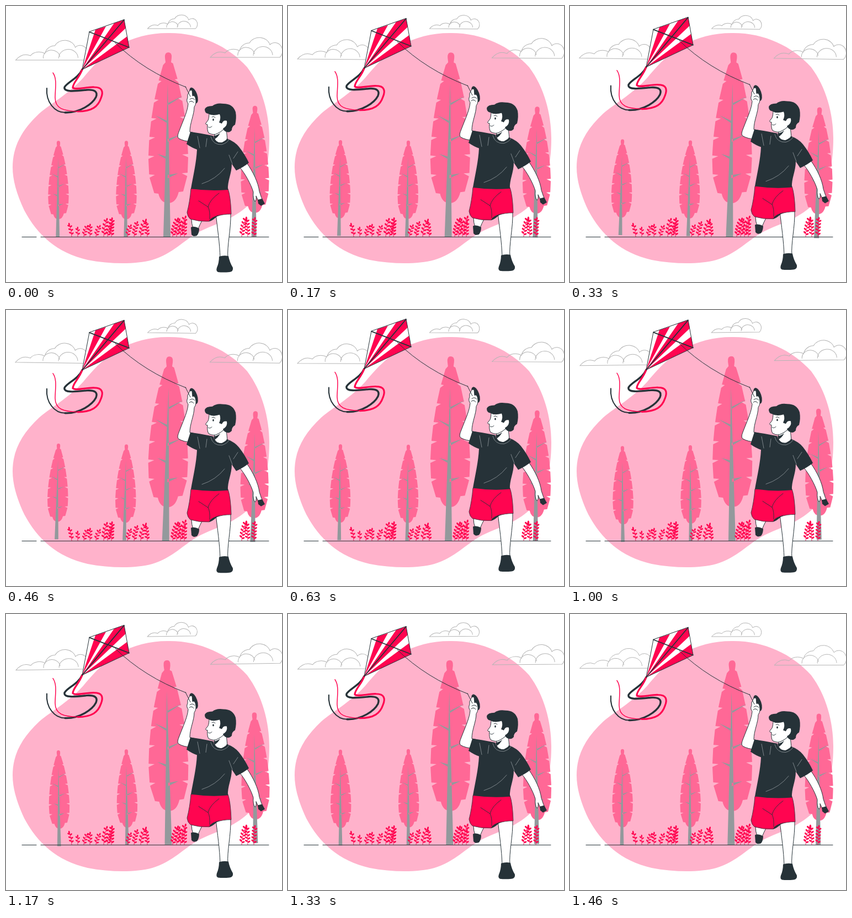
An HTML page for the animation above (1500 ms loop, 500 by 500 pixels).

```html
<!DOCTYPE html>
<html lang="en">
<head>
<meta charset="utf-8">
<title>Boy flying a kite</title>
<style>
  html, body { margin: 0; height: 100%; overflow: hidden; background: #fff; }
  svg { display: block; width: 100vw; height: 100vh; }
  .dark { fill: #263238; }
  .red { fill: #ff0550; }
  .bark { fill: #93999c; }
  .skin { fill: #fff; stroke: #263238; stroke-linejoin: round; }
  .line { fill: none; stroke: #263238; stroke-linecap: round; stroke-linejoin: round; }
  .ribbon { fill: none; stroke-linecap: round; }
  .crease { fill: none; stroke: #a3aaae; stroke-width: .7; stroke-linecap: round; }
  .cloud { fill: none; stroke: #b4b4b4; vector-effect: non-scaling-stroke; }
</style>
</head>
<body>
<svg viewBox="0 0 500 500">
  <defs>
    <path id="cloud" class="cloud" d="M0 0Q12-14 27-8a17 12 0 0 1 26-4a18 18 0 0 1 18-14a20 18 0 0 1 37 3a11 12 0 0 1 18 23ZM50-3a10 9 0 0 1 30-3M78-3a12 11 0 0 1 35-1"/>
    <g id="tree">
      <path id="foliage" fill="#ff6896"/>
      <path id="trunk" class="bark"/>
    </g>
  </defs>

  <path fill="#ffb2cb" d="M293 49C350 48 402 72 437 111C464 147 477 195 477 240C477 290 467 332 438 362C412 386 381 394 352 408C322 424 302 449 265 460C235 468 190 468 148 460C92 447 57 415 33 370C19 340 12 315 12 292C12 255 28 225 60 195C85 174 115 158 140 130C165 100 180 86 205 71C230 57 260 49 293 49Z"/>

  <g id="clouds">
    <use href="#cloud" transform="translate(17.5 98)"/>
    <use href="#cloud" transform="translate(256.5 41) scale(.69)"/>
    <use href="#cloud" transform="translate(370 93)"/>
  </g>

  <g id="trees">
    <use href="#tree" transform="translate(95 418) scale(.52)"/>
    <use href="#tree" transform="translate(218 418) scale(.52)"/>
    <use href="#tree" transform="translate(294 418)"/>
    <use href="#tree" transform="translate(451 418) scale(.71)"/>
  </g>

  <path class="line" d="M29 418.5H55M63 418.5H476"/>
  <g id="bushes"></g>

  <g id="flyer">
    <!-- tails, thinner towards the end -->
    <g class="ribbon" stroke="#263238">
      <path stroke-width="3.4" d="M138 115C131 131 111 138 106 147C104 157 127 154 146 152C160 151 167 155 163 165C157 177 134 194 107 193"/>
      <path stroke-width="2" d="M107 193C88 193 72 174 74 149"/>
    </g>
    <g class="ribbon" stroke="#ff0550">
      <path stroke-width="3.2" d="M138 115C133 130 121 139 121 148C127 153 146 146 160 147C174 147 177 155 172 167C167 182 156 191 130 191"/>
      <path stroke-width="1.5" d="M130 191C104 190 89 186 89 166C89 150 93 132 85 121"/>
    </g>

    <!-- kite -->
    <path fill="#fff" d="M214 25L223 75L138 115L151 47Z"/>
    <path class="red" d="M138 115L162 43L181 37ZM138 115L196 31L214 25L217 40ZM138 115L219.5 55L223 75Z"/>
    <path class="line" d="M214 25L223 75L138 115L151 47Z"/>
    <path class="line" stroke-width="1.7" d="M151 47L223 75M214 25L138 115"/>
    <path class="line" d="M198 67Q250 118 326 147"/>

    <!-- raised arm -->
    <ellipse class="dark" cx="340" cy="162" rx="6.5" ry="15" transform="rotate(-19 340 162)"/>
    <path class="skin" d="M330 177C329 190 322 205 317 218C312 231 309 236 313 240Q322 245 336 246L342 230L333 228C333 212 341 197 341 183Q346 176 343 166Q341 161 338 163L337 153Q333 151 331 157Q328 160 329 166Q326 172 330 177Z"/>
    <path class="line" d="M325 146L334 164M333 169Q338 165 342 170M332 174Q336 170 340 175"/>

    <!-- legs and shoes -->
    <path class="skin" d="M336 385Q336 395 339 403L348 404Q351 396 356 387Z"/>
    <path class="dark" d="M335 401Q340 398 350 403Q350 411 346 416Q339 419 336 414Z"/>
    <path class="skin" d="M380 376C383 403 387 428 388 457H402C400 434 408 405 407 374Z"/>
    <path class="dark" d="M386 454Q394 451 403 453Q405 464 411 474Q412 481 405 482Q393 483 384 482Q380 480 382 474Q386 465 386 454Z"/>

    <!-- shorts -->
    <path class="red" stroke="#263238" stroke-width=".8" d="M335 331H402Q407 345 408 377Q392 377 382 381Q374 388 368 390Q350 391 334 386Q329 382 328 374Q333 355 335 331Z"/>
    <path class="dark" d="M368 390Q370 382 392 377Q384 379 381 382Q374 389 368 390Z"/>
    <path class="line" stroke-width=".9" d="M369 386Q370 371 366 364L349 353M366 364Q369 351 386 339"/>

    <!-- lowered arm -->
    <path class="skin" d="M424 293C432 302 444 323 448 337Q447 349 451 354Q454 353 453 344Q457 354 461 360L467 357Q462 346 459 336C457 320 448 301 436 284Z"/>
    <path class="dark" d="M456 351L464 349L469 358L462 362L457 358Z"/>

    <!-- neck and shirt -->
    <path class="skin" d="M379 228L377 238Q380 249 391 248L401 242L399 222Z"/>
    <path class="dark" d="M376 235Q382 235 388 230Q384 238 378 241Z"/>
    <path class="dark" d="M334 228Q350 230 375 235Q380 250 392 247Q399 244 400 240Q415 246 422 255Q433 269 440 284Q430 292 417 298L409 286C409 304 401 317 402 333Q369 336 335 331C339 308 345 283 346 260Q337 257 327 250Z"/>
    <path class="crease" d="M371 237Q375 252 391 251Q401 248 404 242M347 236L351 257M364 240L362 255M410 286L404 270M412 276L420 264M355 322Q380 314 396 294"/>

    <!-- head -->
    <path class="skin" d="M368 192Q368 203 366 207L361.5 213Q362 215 365 215Q364 225 367 230Q376 235 383 231Q396 225 403 212L400 190Z"/>
    <path class="dark" d="M360 187Q362 181 374 181Q381 175 394 177Q411 177 416 192Q418 203 415 215Q409 218 409 225Q404 231 397 227Q394 225 393 222Q402 217 400 208Q394 206 391 213L386 211Q390 203 387 196Q374 200 366 195Q360 194 360 187Z"/>
    <ellipse class="dark" cx="375.5" cy="206" rx="1.3" ry="2"/>
    <path class="line" stroke-width=".9" d="M373 201Q376 199 379 202M366 219Q369 222 373 218"/>
  </g>
</svg>
<script>
  const $ = id => document.getElementById(id);
  const PERIOD = 1500, GROUND = 418;
  const TOP = -334, BOTTOM = -61;

  let seed = 7;
  const random = () => (seed = seed * 16807 % 2147483647) / 2147483647;

  // Half width of the foliage: swells from the top, closes quickly at the bottom.
  function halfWidth(y) {
    const s = (y - TOP) / (BOTTOM - TOP);
    return 37 * Math.sin(Math.PI / 2 * (s / .8) ** .8) * Math.sqrt(1 - s ** 10);
  }

  function foliageSide(sign) {
    const lobes = 7, pitch = 34;
    let d = `M0 ${TOP}Q${sign * 7} ${TOP} ${sign * 6} ${TOP + 10}L${sign * 5} ${TOP + 18}`;
    for (let i = 0; i < lobes; i++) {
      const y = TOP + 20 + i * pitch + (sign < 0 ? 3 : 0), end = y + pitch - 6, w = halfWidth(end);
      d += `L${sign * halfWidth(y)} ${y}L${sign * w} ${end}L${sign * w * .7} ${end + 1}`;
    }
    return d + `Q${sign * 14} ${BOTTOM} 0 ${BOTTOM}Z`;
  }
  $('foliage').setAttribute('d', foliageSide(1) + foliageSide(-1));

  // A tapered trunk with branches on alternate sides.
  let trunk = 'M-9 0L-1-278L4 0Z';
  for (let i = 0; i < 5; i++) {
    const side = i % 2 ? -1 : 1, y = -106 - 33 * i;
    trunk += `M-1 ${y}L${side * (18 + 2 * i)} ${y - 9 - 2 * i}L-1 ${y - 6 + i / 2}Z`;
  }
  $('trunk').setAttribute('d', trunk);

  // A leaning stem with paired leaves and one at the tip.
  function sprig(base, tip, height) {
    const size = 1.9 + height / 38, pairs = Math.round(height / 7);
    const lean = Math.atan2(tip - base, height) * 180 / Math.PI;
    const leaf = (x, y, angle) =>
      `<ellipse class="red" rx="${size * .55}" ry="${size}" transform="translate(${x} ${y}) rotate(${angle}) translate(0 ${-size})"/>`;
    let out = `<path d="M${base} ${GROUND}Q${base} ${GROUND - height / 2} ${tip} ${GROUND - height}" fill="none" stroke="#ff0550" stroke-width=".8"/>`;
    for (let i = 1; i <= pairs; i++) {
      const u = i / (pairs + .5), x = base + (tip - base) * u * u, y = GROUND - height * u;
      out += leaf(x, y, lean - 60) + leaf(x, y + 2, lean + 60);
    }
    return out + leaf(tip, GROUND + 2 - height, lean);
  }

  function clump(x, count, gap, tallest) {
    return Array.from({ length: count }, (_, i) => {
      const base = x + i * gap;
      return sprig(base, base + (random() - .3) * 14, tallest * (.6 + .4 * random()));
    }).join('');
  }
  $('bushes').innerHTML = clump(119, 5, 11, 23) + clump(177, 3, 7, 36) +
    clump(220, 4, 12, 32) + clump(302, 4, 7, 36) + clump(427, 3, 11, 45);

  function draw(now) {
    const p = now % PERIOD / PERIOD;
    const sway = Math.asin(Math.sin(2 * Math.PI * p)) * 2 / Math.PI;
    const rise = 10 * (1 - Math.abs(1 - 2 * p));
    $('clouds').setAttribute('transform', `rotate(${sway} 256.5 56)`);
    $('trees').setAttribute('transform', `rotate(${sway} 276.5 251)`);
    $('flyer').setAttribute('transform', `translate(0 ${-rise})`);
    requestAnimationFrame(draw);
  }
  draw(performance.now());
</script>
</body>
</html>
```
